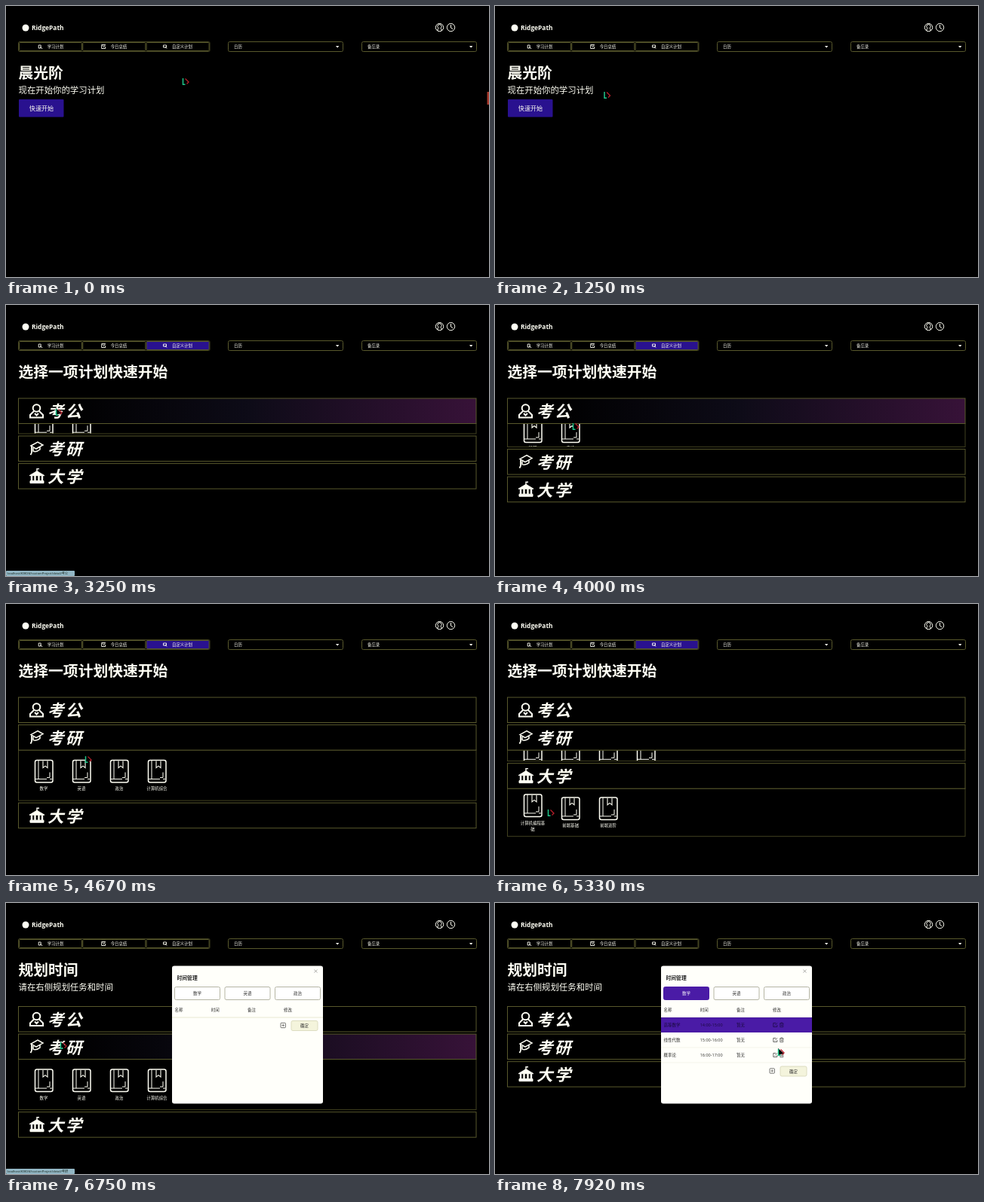
An HTML page for the animation above (8 s loop, 640 by 360 pixels).

```html
<!DOCTYPE html>
<html lang="zh-CN">
<head>
<meta charset="utf-8">
<title>学习计划</title>
<style>
html, body { margin: 0; width: 100%; height: 100%; overflow: hidden; background: #000; }
svg { display: block; width: 640px; height: 360px; }
text { font-family: "Open Sans", "Noto Sans CJK SC", "Noto Sans CJK", sans-serif; white-space: pre; }
</style>
</head>
<body>
<svg id="stage" viewBox="0 0 640 360"></svg>
<script>
const stage = document.getElementById('stage');
const PALE = '#fffff4', EDGE = '#58582c', DIM = '#414120', INK = '#2c2c2c', VIOLET = '#4a1ba6', INDIGO = '#29118f';
const TICKS = 12, LOOP = 96; // all times below are in ticks of 1/12 s

const within = (k, [a, b]) => k >= a && k < b;
const smooth = u => (u = Math.min(1, Math.max(0, u)), u * u * (3 - 2 * u));

// y is the vertical middle of the glyphs
const text = (x, y, size, str, more = '', fill = PALE) =>
  `<text x="${x}" y="${y + size * .37}" font-size="${size}" fill="${fill}" ${more}>${str}</text>`;
const rect = (x, y, w, h, fill, stroke = 'none', r = 0, more = '') =>
  `<rect x="${x}" y="${y}" width="${w}" height="${h}" rx="${r}" fill="${fill}" stroke="${stroke}" ${more}/>`;
const line = (d, color = PALE, w = 1, fill = 'none') =>
  `<path d="${d}" stroke="${color}" stroke-width="${w}" fill="${fill}"/>`;
const put = (x, y, body) => `<g transform="translate(${x} ${y})">${body}</g>`;
const MID = 'text-anchor="middle"', BOLD = 'font-weight="700"', MEDIUM = 'font-weight="500"';

// Stops of the pointer: tick, x, y
const STOPS = [
  [0, 234, 95], [6, 231, 103], [12, 204, 94], [18, 85, 132], [24, 60, 132], [27, 71, 72],
  [30, 64, 128], [39, 66, 137], [45, 110, 52], [48, 103, 156], [54, 105, 176], [61, 105, 264],
  [64, 70, 272], [68, 70, 272], [72, 110, 178], [75, 72, 184], [85, 72, 184], [90, 260, 122],
  [92, 262, 122], [95, 375, 193]
];
function pointerAt(k) {
  const i = Math.max(1, STOPS.findIndex(s => s[0] >= k));
  const [t0, x0, y0] = STOPS[i - 1], [t1, x1, y1] = STOPS[i];
  const u = (k - t0) / (t1 - t0);
  return [x0 + (x1 - x0) * u, y0 + (y1 - y0) * u];
}

const ROWS = [
  { name: '考公', items: ['行测', '申论'], height: 67, spans: [[37.85, 43], [46.1, 52]] },
  { name: '考研', items: ['数学', '英语', '政治', '计算机综合'], height: 67, spans: [[52, 61.2], [69.5, 86]] },
  { name: '大学', items: ['计算机编程基础', '前端基础', '前端进阶'], height: 81, spans: [[61.2, 69.5]] }
];
const UNFOLD = 4;
const foldout = (row, k) => row.height * row.spans.reduce(
  (sum, [a, b]) => sum + smooth((k - a) / UNFOLD) - smooth((k - b) / UNFOLD), 0);

// Places of the rows, and whether the pointer is on their heads
function layout(k) {
  const [px, py] = pointerAt(k);
  let y = k < 81 ? 124 : 137.5;
  return ROWS.map(row => {
    const h = foldout(row, k), top = y;
    y += 36.6 + h;
    return { ...row, h, top, hot: px < 220 && within(py, [top, top + 34]) };
  });
}

const ICONS = [
  `<circle cx="9.5" cy="6" r="4.8" stroke="${PALE}" stroke-width="2" fill="none"/>` +
    line('M6 10L1 15V18.5H18V15L13 10M7 13L9.5 15.5L12 13', PALE, 2),
  line('M2 6L11 1L18 5L9 10ZM5 9V13Q9 15 14 11V8', PALE, 1.5) + line('M3 7V15L1.5 18', PALE, 1.8),
  line('M0 9L10 3L20 9ZM1 16H19V19H1Z', PALE, 1, PALE) + line('M3 9V16M7.5 9V16M12.5 9V16M17 9V16', PALE, 2.4) +
    line('M10 4V0H13', PALE, 1.4)
];

const book = (x, y) => put(x, y,
  rect(-11.5, 0, 23.5, 29.5, 'none', PALE, 2.5, 'stroke-width="1.5"') +
  line('M-7 0V25M-11 25H4M8 25H11M8 16V23H4') + line('M-1 1V10L2 7.5L5 10V1', PALE, 1.1));

function panel({ items, h, top }, id) {
  if (h < .5) return '';
  const mid = h / 2;
  const books = items.map((label, i) => {
    const x = 50 + 50 * i, rest = label.slice(6);
    return book(x, mid - (rest ? 24 : 20)) + text(x, mid + (rest ? 14 : 17.5), 5.4, label.slice(0, 6), MID) +
      text(x, mid + 22, 5.4, rest, MID);
  }).join('');
  return `<clipPath id="c${id}"><rect x="16" width="608" height="${h}"/></clipPath>` +
    put(0, top + 33.5, `<g clip-path="url(#c${id})">${books}</g>` + rect(16.5, 0, 606.5, h, 'none', DIM));
}

const accordion = rows => rows.map((row, i) =>
  panel(row, i) + rect(16.5, row.top, 606.5, 33.5, row.hot ? 'url(#glow)' : '#000', EDGE) +
  put(31, row.top + 7, ICONS[i]) +
  text(55, row.top + 17.5, 21.5, row.name, BOLD + ' font-style="italic" letter-spacing="2.6"')).join('');

function header(k) {
  const glyphs = ['M-2 -2H1V2H-2ZM0 0L3 3', 'M2.5 0V2.5H-2.5V-2.5H2.5L0 1M-1.5 -1H0', 'M-2 -2H2V1H-2ZM0 0L2.5 2.5'];
  const tabs = ['学习计划', '今日总结', '自定义计划'].map((label, i) => {
    const mid = 65.5 + 84 * i, on = i === 2 && within(k, [38, 81]);
    return rect(17.5 + 84.3 * i, 48.5, 83, 11, on ? INDIGO : 'none', EDGE, 1) +
      put(mid - label.length * 2.7 - 9.5, 54, line(glyphs[i], PALE, .9)) + text(mid, 54, 5.4, label, MID);
  }).join('');
  const drops = ['日历', '备忘录'].map((label, i) => {
    const x = 294.5 + 177 * i;
    return rect(x, 47.5, 152, 13, 'none', EDGE, 2) + text(x + 7.5, 54, 5.4, label) +
      `<path d="M${x + 142.5} 53h4.4l-2.2 2.6z" fill="${PALE}"/>`;
  }).join('');
  return `<circle cx="26" cy="29" r="4.5" fill="${PALE}"/>` + text(34, 28.7, 8.4, 'RidgePath', BOLD) +
    `<g fill="none" stroke="${PALE}"><circle cx="574.5" cy="28.5" r="5.2"/><circle cx="589.5" cy="28.5" r="5.2"/>
     <path d="M572 33V31L573 29.5A2.6 2.8 0 1 1 576 29.5L577 31V33M589.5 25V29L592 30.5"/></g>` +
    rect(16.5, 47.5, 253.5, 13, 'none', DIM, 1.5) + tabs + drops;
}

const title = str => text(16.5, 88.5, 19.8, str, BOLD);
const subtitle = str => text(16.5, 111.3, 11.4, str, MEDIUM);
const onStart = k => within(k, [21, 29]) || within(k, [32, 38]);

const home = k => title('晨光阶') + subtitle('现在开始你的学习计划') +
  rect(17, 124, 59.5, 23.5, onStart(k) ? '#3b1b9c' : INDIGO, 'none', 1) +
  text(47, 136, 8.1, '快速开始', MID + ' ' + MEDIUM) +
  (k < 2 ? rect(637.5, 114, 2.5, 17, '#a83a2c') : '');

const pencil = (x, y, c) => put(x, y, line('M1 -2.5H-2.5V2.5H2.5V0M-.5 .7L2.7 -2.6', c, .7));
const trash = (x, y, c) => put(x, y, line('M-2.7 -2H2.7M-1 -2V-3H1V-2M-2 -2V2.8H2V-2M-.6 -.5V1.5M.6 -.5V1.5', c, .6));

function dialog(k) {
  const filled = k >= 92, footer = filled ? 223 : 162.5;
  const small = (x, y, str, color = INK, more = '') => text(x, y, 5.5, str, more, color);
  const cells = (words, y, color) => words.map((s, i) => small(223.5 + 48.2 * i, y, s, color)).join('');
  const tabs = ['数学', '英语', '政治'].map((label, i) => {
    const on = filled && i === 0, x = 223.5 + i * 66.5;
    return rect(x, 111.5, 60, 17, on ? VIOLET : '#fff', on ? VIOLET : '#b5b5a4', 2) +
      small(x + 30, 120.3, label, on ? '#fff' : INK, MID);
  }).join('');
  const table = ['高等数学', '线性代数', '概率论'].map((name, i) => {
    const y = 162 + 20 * i, hot = i === 0 && k >= 93, c = hot ? '#190a3c' : INK;
    return (hot ? rect(220, 152, 200, 20, VIOLET) : line(`M220 ${y + 10}H420`, '#eeeee0', .6)) +
      cells([name, `${14 + i}:00-${15 + i}:00`, '暂无'], y, c) + pencil(371.3, y, c) + trash(379.8, y, c);
  }).join('');
  return rect(220, 83.5, 200, 183, '#fffffa', 'none', 3) +
    text(226.5, 99.5, 6.8, '时间管理', BOLD, '#222') +
    line('M408.5 88.5l4 4m0 -4l-4 4', '#858580', .7) + tabs +
    cells(['名称', '时间', '备注', '修改'], 142) + line('M220 152H420', '#e4e4c8', .8) + (filled ? table : '') +
    rect(364, footer - 3.2, 6.4, 6.4, 'none', '#555', .8, 'stroke-width=".8"') +
    line(`M365.5 ${footer}h3.4m-1.7 -1.7v3.4`, '#555', .7) +
    rect(378, footer - 6, 35, 13, '#f4f4dc', '#dcdcc0', 2) +
    small(395.5, footer + .5, '确定', INK, MID);
}

// Link address shown while the pointer is on a link
function status(k, rows) {
  const plan = k >= 38 && pointerAt(k)[0] < 102 && rows.find(row => row.hot);
  if (!plan && !onStart(k)) return '';
  return rect(0, 353, plan ? 91 : 65, 7, '#92b6c4', 'none', 1) +
    text(1.5, 356.5, 4, 'localhost:8080/#/customProject' + (plan ? '/detail/' + plan.name : ''), '', '#16251b');
}

const pointer = k => put(...pointerAt(k), `<path d="M0 0V10L3 8L8 7Z" fill="#000"/>` +
  line('M.5 1V9.2H3.5', '#1fc58a', 1.5) + line('M3.5 1.5L8 6L5.5 8.5', '#b81f2b', 1.3));

const GLOW = `<linearGradient id="glow"><stop offset=".1" stop-color="#000"/>
  <stop offset=".5" stop-color="#0d0b17"/><stop offset="1" stop-color="#371238"/></linearGradient>`;

function scene(k) {
  const rows = layout(k);
  const body = k < 38 ? home(k)
    : k < 81 ? title('选择一项计划快速开始') + accordion(rows)
    : title('规划时间') + subtitle('请在右侧规划任务和时间') + accordion(rows) + dialog(k);
  return `<defs>${GLOW}</defs>` + header(k) + body + status(k, rows) + pointer(k);
}

let shown = -1;
function play(now) {
  let k = Math.floor(now * TICKS / 1000 + .05) % LOOP;
  if (k % 6 === 1) k--; // one tick in six holds still
  if (k !== shown) stage.innerHTML = scene(shown = k);
  requestAnimationFrame(play);
}
play(performance.now());
</script>
</body>
</html>
```
